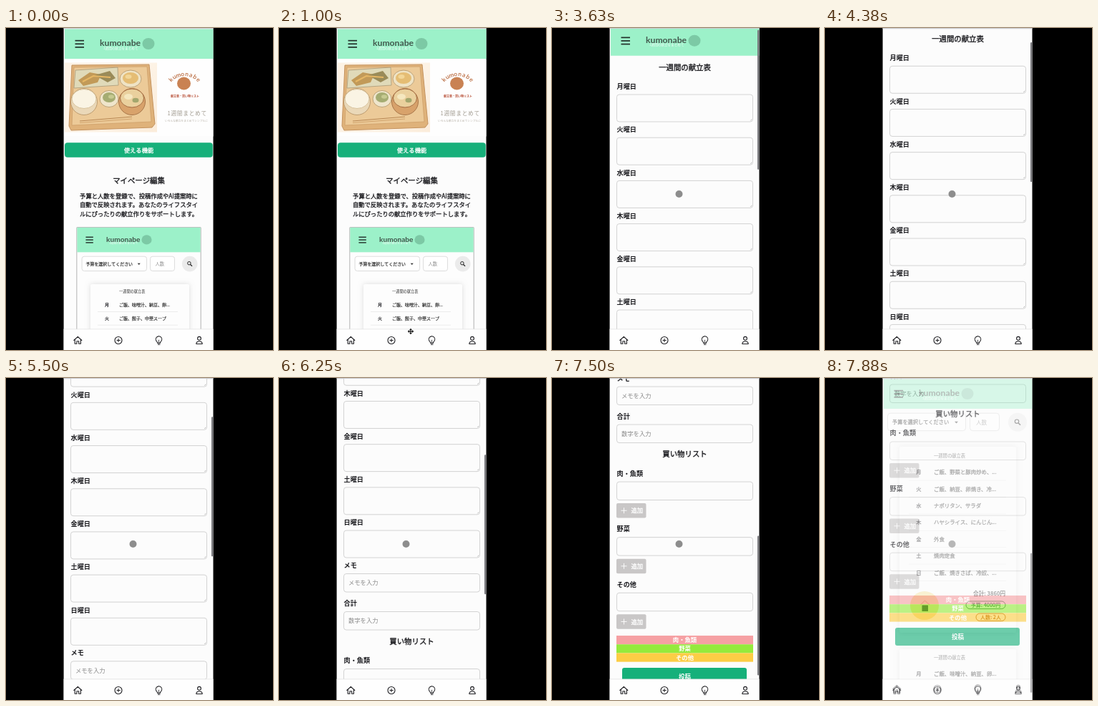
An HTML page with a canvas that plays this animation: 373 px wide and 450 px high, repeating every 8 s.

```html
<!DOCTYPE html>
<html lang="ja">
<head>
<meta charset="utf-8">
<title>kumonabe</title>
<style>
html, body { margin: 0; width: 100%; height: 100%; overflow: hidden; background: #000; }
canvas { display: block; width: 373px; height: 450px; }
</style>
</head>
<body>
<canvas id="stage"></canvas>
<script>
const W = 373, H = 450, LOOP = 8000;
const LEFT = 80.6, PAGE_W = 208.9;
const NAME = 'kumonabe';
const INK = '#1c1c20', PAPER = '#fcfcfc', MINT = '#9cf1c9', GREEN = '#16b07a', LINE = '#cbcbcb';
const JP = '"Noto Sans CJK JP", "Noto Sans CJK", "Noto Sans", sans-serif';
const LATIN = 'Lato, "Open Sans", sans-serif';
const canvas = document.getElementById('stage');
const ctx = canvas.getContext('2d');
const ratio = window.devicePixelRatio || 1;
canvas.width = W * ratio;
canvas.height = H * ratio;

const PAGE_SWITCH = 2000, FADE_START = 7740, FADE_LENGTH = 370;
const SCROLL = [[3550, 0], [4380, 44], [5500, 123], [6880, 348], [7720, 563]];
const POINTER = [[600, 184, 424], [1100, 184, 424], [1650, 158, 435], [2680, 158, 435], [3350, 177.5, 232]];

// y is the optical middle of the glyphs; weight 500 is regular plus a hairline
function text(str, x, y, size, color = INK, weight = 400, align = 'left', font = JP) {
  const medium = weight === 500;
  ctx.font = `${medium ? 400 : weight} ${size}px ${font}`;
  ctx.fillStyle = color;
  ctx.textAlign = align;
  ctx.fillText(str, x, y + size * 0.38);
  if (!medium) return;
  ctx.strokeStyle = color;
  ctx.lineWidth = size * 0.035;
  ctx.strokeText(str, x, y + size * 0.38);
}

function rect(x, y, w, h, color) {
  ctx.fillStyle = color;
  ctx.fillRect(x, y, w, h);
}

function box(x, y, w, h, r, fill, stroke, width = 0.8) {
  ctx.beginPath();
  ctx.roundRect(x, y, w, h, r);
  paint(fill, stroke, width);
}

function oval(x, y, rx, ry, fill, stroke, width = 1) {
  ctx.beginPath();
  ctx.ellipse(x, y, rx, ry, 0, 0, Math.PI * 2);
  paint(fill, stroke, width);
}

function paint(fill, stroke, width) {
  if (fill) { ctx.fillStyle = fill; ctx.fill(); }
  if (stroke) { ctx.strokeStyle = stroke; ctx.lineWidth = width; ctx.stroke(); }
}

function path(points, color = INK, width = 1, close = false, fill = null) {
  ctx.beginPath();
  points.forEach(([x, y]) => ctx.lineTo(x, y));
  if (close) ctx.closePath();
  paint(fill, color, width);
}

function at(x, y, scale, draw) {
  ctx.save();
  ctx.translate(x, y);
  ctx.scale(scale, scale);
  draw();
  ctx.restore();
}

function card(x, y, w, h) {
  ctx.save();
  ctx.shadowColor = 'rgba(0,0,0,.13)';
  ctx.shadowBlur = 7 * ratio;
  box(x, y, w, h, 2, '#fdfdfd');
  ctx.restore();
}

// Top bar and search row, laid out on a 207.5-wide page
function header() {
  rect(0, 0, 207.5, 41.5, MINT);
  for (let i = 0; i < 3; i++) rect(14.5, 15.3 + i * 4.6, 12.5, 1.7, '#22302a');
  ctx.lineJoin = 'round';
  text(NAME, 49, 19, 12.2, '#41574c', 700, 'left', LATIN);
  text('1週間の献立をまとめて', 54, 26.5, 4.6, 'rgba(255,255,255,.85)');
  oval(117, 20.5, 8.5, 8, '#7cc9a5');
}

function search() {
  box(5.5, 47, 109, 24.5, 4, '#fff', LINE);
  text('予算を選択してください', 12, 59.5, 7.2, '#333', 500);
  path([[99, 58.5], [104, 58.5], [101.5, 61.2]], null, 0, true, '#333');
  box(120.5, 47, 41, 24.5, 4, '#fff', LINE);
  text('人数', 129, 59.5, 7.6, '#8b8b8b');
  oval(187, 59.5, 13, 13, '#ebebeb');
  oval(186, 58.5, 2.7, 2.7, null, '#222', 1.2);
  path([[188, 60.5], [191, 63.5]], '#222', 1.6);
}

function screenEdges() {
  rect(LEFT, 0, PAGE_W, H, PAPER);
  rect(LEFT, 0, PAGE_W, 1.2, '#c9c9cd');
}

function nav() {
  rect(LEFT, 421, PAGE_W, 29, '#fefefe');
  rect(LEFT, 420.5, PAGE_W, 0.8, '#e4e4e4');
  icons(0);
}

function icons(dy) {
  ctx.save();
  ctx.translate(0, dy);
  ctx.lineJoin = ctx.lineCap = 'round';
  path([[94.8, 436.5], [100.3, 431.3], [105.8, 436.5]], INK, 1.1);
  path([[96.2, 435.5], [96.2, 441.3], [98.9, 441.3], [98.9, 437.8], [101.7, 437.8],
    [101.7, 441.3], [104.4, 441.3], [104.4, 435.5]], INK, 1.1);
  oval(157, 436.5, 5, 5, null, INK, 1.1);
  path([[154.8, 436.5], [159.2, 436.5]]);
  path([[157, 434.3], [157, 438.7]]);
  ctx.beginPath();
  ctx.arc(213.5, 435, 4.2, 2.2, Math.PI + 4.05);
  ctx.lineTo(215.2, 440.5);
  ctx.lineTo(211.8, 440.5);
  ctx.closePath();
  paint(null, INK, 1.1);
  path([[212, 442.3], [215, 442.3]]);
  path([[213.5, 436], [213.5, 440]], INK, 0.8);
  oval(270, 433.8, 2.4, 2.4, null, INK, 1.1);
  ctx.beginPath();
  ctx.moveTo(265.8, 441.5);
  ctx.bezierCurveTo(265.8, 436.8, 274.2, 436.8, 274.2, 441.5);
  ctx.closePath();
  paint(null, INK, 1.1);
  ctx.restore();
}

function meal() {
  const wash = ctx.createLinearGradient(82, 49, 211, 146);
  wash.addColorStop(0, '#fcf2e5');
  wash.addColorStop(0.6, '#fdf3e6');
  wash.addColorStop(1, '#fbecda');
  rect(82, 48.5, 129, 97, wash);
  path([[92, 52], [200, 51], [208, 134], [204, 139], [91, 143], [88, 137]], '#c4935f', 1, true, '#dfb27a');
  path([[95, 55], [197, 54], [203, 131], [92, 136]], '#cfa06a', 0.8, true, '#ecca98');
  path([[97, 59], [156, 55], [157, 80], [95, 84]], '#a99a79', 0.8, true, '#e0dab9');
  path([[101, 73], [117, 62], [133, 65], [128, 76], [108, 81]], null, 0, true, '#c29a58');
  path([[124, 66], [145, 60], [153, 70], [142, 76]], null, 0, true, '#9a8b59');
  path([[107, 75], [122, 67], [146, 69]], '#e6b765', 2);
  oval(174, 71, 15, 12, '#efe3c5', '#bda278');
  oval(174, 70, 11, 8, '#e5bd74');
  oval(171, 68, 4.5, 3, '#f2d698');
  oval(109, 103, 18.5, 18.5, '#ead8b8', '#bd9c70');
  oval(109, 99, 17, 13.5, '#faf4e4', '#d8c39d');
  oval(144, 99, 13, 11.5, '#efe5cb', '#bca276');
  oval(144, 97, 9, 7, '#a5ac72');
  oval(147, 96, 4, 2.8, '#c6ca91');
  oval(176, 103, 18.5, 18.5, '#d8a26b', '#a9774a');
  oval(176, 98, 16.5, 13, '#ead09d', '#a56d43');
  oval(171, 96, 6, 4, '#f5e7bf');
  oval(181, 101, 4.5, 3.2, '#a3a66d');
  path([[103, 130], [176, 124]], '#b98854', 1.2);
  path([[103, 132.5], [176, 127]], '#cd9f68', 0.9);
}

function brandPanel() {
  [...NAME].forEach((letter, i) => {
    const angle = (i - 3.5) * 0.22;
    ctx.save();
    ctx.translate(249.5, 92);
    ctx.rotate(angle);
    text(letter, 0, -28, 8.4, '#b8683c', 600, 'center', LATIN);
    ctx.restore();
  });
  oval(248.5, 77.5, 9.5, 9, '#c98253');
  text('献立表・買い物リスト', 250, 95, 4, '#b4472d', 700, 'center');
  ctx.letterSpacing = '0.7px';
  text('1週間まとめて', 225.5, 119.5, 7.7, '#a09a8f');
  ctx.letterSpacing = '0px';
  text('いろんな献立をまとめてシンプルに', 222, 129.5, 3.75, '#b5afa5');
}

function homePage() {
  screenEdges();
  at(82, 1.5, 1, header);
  rect(82, 43.5, 207.5, 108, '#fefefe');
  meal();
  brandPanel();
  box(82, 160.3, 206.8, 20.5, 4, GREEN);
  text('使える機能', 185.5, 170.5, 8.3, '#fff', 500, 'center');
  text('マイページ編集', 185.5, 213, 10.4, INK, 500, 'center');
  ['予算と人数を登録で、投稿作成やAI提案時に', '自動で反映されます。あなたのライフスタイ', 'ルにぴったりの献立作りをサポートします。']
    .forEach((s, i) => text(s, 185.5, 235 + i * 12.2, 8.3, INK, 500, 'center'));

  box(98.8, 278.5, 173.4, 170, 1, '#fdfdfd', '#bdbdbd', 1.2);
  at(99.4, 278.9, 0.83, header);
  at(101.5, 280.2, 0.83, search);
  card(118, 358, 138, 90);
  text('一週間の献立表', 158, 368.3, 5.2, '#333');
  [['月', 'ご飯、味噌汁、納豆、卵...'], ['火', 'ご飯、餃子、中華スープ']].forEach(([day, dish], i) => {
    const y = 387 + i * 18.8;
    text(day, 141, y, 6, INK, 700, 'center');
    text(dish, 158, y, 6, '#333', 500);
    rect(128, y + 9, 112, 0.6, '#e2e2e2');
  });
  nav();
}

function label(str, y) { text(str, 90.5, y, 9.15, INK, 700); }

function field(y, h, hint) {
  box(90.5, y, 190, h, 3.5, PAPER, '#c8c8c8');
  if (hint) text(hint, 97, y + h / 2, 8.3, '#8a8a8a');
}

function addButton(y) {
  box(90, y, 41.5, 20.5, 2, '#c9c7c7');
  path([[96.5, y + 10.2], [104.5, y + 10.2]], '#fff', 0.9);
  path([[100.5, y + 6.2], [100.5, y + 14.2]], '#fff', 0.9);
  text('追加', 110.5, y + 10.2, 8.4, '#fff', 500);
}

function formPage(scroll) {
  screenEdges();
  ctx.save();
  ctx.beginPath();
  ctx.rect(80, 1, 210, 420);
  ctx.clip();
  ctx.translate(0, -scroll);
  at(82, 1.5, 1, header);
  text('一週間の献立表', 185.5, 59, 10.4, INK, 500, 'center');
  [...'月火水木金土日'].forEach((day, i) => {
    const y = 86 + i * 60.2;
    label(day + '曜日', y);
    field(y + 11.3, 38, '');
    path([[277.3, y + 47.8], [279.3, y + 45.8]], '#888', 0.6);
  });
  label('メモ', 507);
  field(519, 25.5, 'メモを入力');
  label('合計', 560);
  field(572, 25.5, '数字を入力');
  text('買い物リスト', 185.5, 613, 10.4, INK, 500, 'center');
  const groups = [['肉・魚類', '#f6a0a3'], ['野菜', '#95ea3c'], ['その他', '#fccd45']];
  groups.forEach(([name, color], i) => {
    const y = 640 + i * 77.6;
    label(name, y);
    field(y + 12, 25.5, '');
    addButton(y + 42);
    rect(90, 867 + i * 12.2, 191, 12.2, color);
    text(name, 185.5, 873 + i * 12.2, 8.4, '#fff', 700, 'center');
  });
  box(98, 912, 174, 25, 3, GREEN);
  text('投稿', 185.5, 924.5, 8.6, '#fff', 700, 'center');
  ctx.restore();
  nav();
  if (scroll > 0) box(287, 1 + scroll * 0.433, 2.4, 195, 1.2, '#77777b');
}

function badge(str, x, y, w, color) {
  box(x, y - 5.3, w, 10.6, 5.3, null, color, 1);
  text(str, x + w / 2, y, 7, color, 700, 'center');
}

function myPage() {
  screenEdges();
  at(82, 1.5, 1, header);
  at(82, 2.2, 1, search);
  ctx.save();
  ctx.beginPath();
  ctx.rect(80, 75, 210, 346);
  ctx.clip();
  card(104, 96, 163, 260);
  text('一週間の献立表', 152, 109, 6.3, '#333');
  const dishes = ['ご飯、野菜と豚肉炒め、...', 'ご飯、納豆、卵焼き、冷...', 'ナポリタン、サラダ',
    'ハヤシライス、にんじん...', '外食', '焼肉定食', 'ご飯、焼きさば、冷奴、...'];
  dishes.forEach((dish, i) => row('月火水木金土日'[i], dish, 131.3 + i * 23.4));
  text('合計: 3860円', 252, 301, 7.6, '#222', 700, 'right');
  badge('予算: 4000円', 197, 317.3, 55, '#17683c');
  badge('人数: 2人', 211, 334.3, 41, '#a85200');
  oval(139, 318, 20, 20, 'rgba(240,206,70,.6)');
  box(135.5, 317.5, 8.5, 8.5, 0.5, '#171a08');
  path([[133.5, 317], [139.5, 311], [146, 317]], '#e2a55a', 1.2);
  card(104, 379, 163, 70);
  text('一週間の献立表', 152, 391, 6.3, '#333');
  row('月', 'ご飯、味噌汁、納豆、卵...', 413);
  ctx.restore();
  rect(LEFT, 421, PAGE_W, 29, '#fefefe');
  icons(-2);
}

function row(day, dish, y) {
  text(day, 131, y, 7.4, INK, 700, 'center');
  text(dish, 152, y, 7.4, '#333', 500);
  rect(117, y + 11.5, 136, 0.6, '#e2e2e2');
}

// Piecewise linear track; each key is [time, ...values]
function track(keys, t) {
  if (t <= keys[0][0]) return keys[0].slice(1);
  for (let i = 1; i < keys.length; i++) {
    const a = keys[i - 1], b = keys[i];
    if (t <= b[0]) {
      const k = (t - a[0]) / (b[0] - a[0]);
      return a.slice(1).map((v, j) => v + (b[j + 1] - v) * k);
    }
  }
  return keys[keys.length - 1].slice(1);
}

function pointer(t) {
  if (t < POINTER[0][0]) return;
  const [x, y] = track(POINTER, t);
  if (t >= 1700) {
    oval(x, y, 5, 5, t < 2700 ? 'rgba(70,70,70,.72)' : '#8d8d8d');
    return;
  }
  ctx.save();
  ctx.translate(x, y);
  for (let i = 0; i < 4; i++) {
    path([[0, 0], [0, -3]], '#111', 1.2);
    path([[-1.9, -2], [0, -4.3], [1.9, -2]], null, 0, true, '#111');
    ctx.rotate(Math.PI / 2);
  }
  ctx.restore();
}

// Keeps the outgoing picture on a layer and lays it over the incoming page
const layer = document.createElement('canvas');
layer.width = canvas.width;
layer.height = canvas.height;
function crossfade(amount) {
  layer.getContext('2d').drawImage(canvas, 0, 0);
  myPage();
  ctx.globalAlpha = 1 - amount;
  ctx.drawImage(layer, 0, 0, W, H);
  ctx.globalAlpha = 1;
}

function frame(now) {
  const t = now % LOOP;
  ctx.setTransform(ratio, 0, 0, ratio, 0, 0);
  rect(0, 0, W, H, '#000');
  if (t < PAGE_SWITCH) homePage();
  else formPage(track(SCROLL, t)[0]);
  pointer(t);
  if (t > FADE_START) crossfade((t - FADE_START) / FADE_LENGTH);
  requestAnimationFrame(frame);
}

requestAnimationFrame(frame);
</script>
</body>
</html>
```
